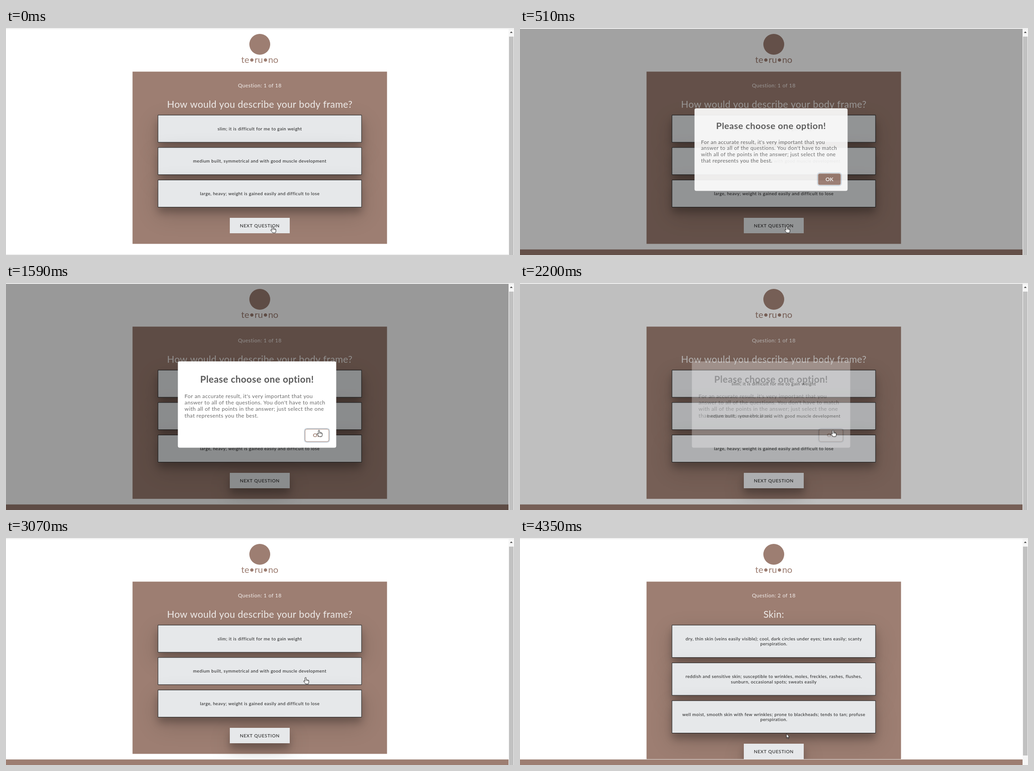
An HTML page with a canvas for the animation above (5330 ms loop, 1119 px wide and 501 px high).

```html
<!DOCTYPE html>
<html lang="en">
<head>
<meta charset="utf-8">
<title>Quiz</title>
<style>
html, body { margin: 0; width: 100%; height: 100%; overflow: hidden; background: #fff; }
canvas { display: block; }
</style>
</head>
<body>
<canvas id="stage" width="1119" height="501"></canvas>
<script>
const canvas = document.getElementById('stage');
const stage = canvas.getContext('2d');
const sheet = canvas.cloneNode().getContext('2d');
let ctx = stage;

const LOOP = 5330;
const BROWN = '#9d7e72', CARD = '#e6e8ea';
const FONT = 'Lato, "Open Sans", sans-serif';

const TICKS = [0, 350, 420, 510, 580, 640, 970, 1040, 1110, 1180, 1250, 1330, 1430, 1520, 1590,
  2200, 2260, 2330, 2400, 3070, 3140, 3540, 3620, 3700, 3770, 3850, 3930, 4350];

// Pointer path: time, x, y
const PATH = [
  [0, 587.5, 438], [969, 587.5, 438], [970, 589, 436], [1430, 660, 352], [1520, 681, 333],
  [1590, 689.5, 325], [3000, 689.5, 325], [3070, 660, 308], [3140, 652, 303],
  [3470, 652, 303], [3930, 587.5, 438], [4349, 587.5, 438], [4350, 587, 432]
];

const HAND = new Path2D('M-1.5 8.5V1.2Q-1.5-.2-.1-.2T1.3 1.2V5Q3 4.3 3.5 5.4 5 4.8 5.5 6 7 5.6 7 7.2V10' +
  'Q7 12 6 14H0Q-2 11-4.5 8.5-4.8 7-3 7.3Z');
const ARROW = new Path2D('M0 0V9.6L2.1 7.6 3.6 11 5.1 10.4 3.6 7.1H6.5Z');

const PAGES = [
  {
    count: 'Question: 1 of 18', title: 'How would you describe your body frame?',
    height: 60, step: 71.6, panel: 380.1, button: 419,
    cards: [
      ['slim; it is difficult for me to gain weight'],
      ['medium built, symmetrical and with good muscle development'],
      ['large, heavy; weight is gained easily and difficult to lose']
    ]
  },
  {
    count: 'Question: 2 of 18', title: 'Skin:',
    height: 71.6, step: 83.4, panel: 405, button: 454,
    cards: [
      ['dry, thin skin (veins easily visible); cool, dark circles under eyes; tans easily; scanty', 'perspiration.'],
      ['reddish and sensitive skin; susceptible to wrinkles, moles, freckles, rashes, flushes,', 'sunburn, occasional spots; sweats easily'],
      ['well moist, smooth skin with few wrinkles; prone to blackheads; tends to tan; profuse', 'perspiration.']
    ]
  }
];

const MESSAGE = [
  "For an accurate result, it's very important that you",
  "answer to all of the questions. You don't have to match",
  'with all of the points in the answer; just select the one',
  'that represents you the best.'
];

const clamp = v => Math.max(0, Math.min(1, v));
const mix = (a, b, k) => a + (b - a) * k;

// CSS "ease": cubic-bezier(.25, .1, .25, 1)
function ease(x) {
  if (x <= 0) return 0;
  if (x >= 1) return 1;
  const bez = (a, b, s) => 3 * a * s * (1 - s) ** 2 + 3 * b * s * s * (1 - s) + s ** 3;
  let lo = 0, hi = 1;
  for (let i = 0; i < 24; i++) {
    const m = (lo + hi) / 2;
    if (bez(.25, .25, m) < x) lo = m; else hi = m;
  }
  return bez(.1, 1, lo);
}

function popScale(p) {
  if (p < .45) return mix(.5, 1.05, ease((p - .01) / .44));
  if (p < .8) return mix(1.05, .95, ease((p - .45) / .35));
  return mix(.95, 1, ease((p - .8) / .2));
}

function rect(x, y, w, h, color) {
  ctx.fillStyle = color;
  ctx.fillRect(x, y, w, h);
}

function round(x, y, w, h, r) {
  ctx.beginPath();
  ctx.roundRect(x, y, w, h, r);
}

function outline(color, width) {
  ctx.strokeStyle = color;
  ctx.lineWidth = width;
  ctx.stroke();
}

function text(str, x, y, size, color, { gap = 0, weight = 400, align = 'center' } = {}) {
  ctx.font = `${weight} ${size}px ${FONT}`;
  ctx.letterSpacing = gap + 'px';
  ctx.textAlign = align;
  ctx.fillStyle = color;
  ctx.fillText(str, x, y);
}

function raised(x, y, w, h, lift) {
  for (const [dy, blur, alpha] of [[17, 50, .19], [12, 16, .24]]) {
    if (lift <= 0) break;
    ctx.save();
    ctx.shadowColor = `rgba(0,0,0,${alpha * lift})`;
    ctx.shadowBlur = blur;
    ctx.shadowOffsetY = dy;
    rect(x, y, w, h, CARD);
    ctx.restore();
  }
  rect(x, y, w, h, CARD);
}

function drawPage(page, cardLift, buttonLift) {
  ctx.fillStyle = BROWN;
  ctx.beginPath();
  ctx.arc(559, 36, 23, 0, 7);
  ctx.fill();
  text('te•ru•no', 559, 77, 20, BROWN);

  rect(278.7, 96.3, 560.6, page.panel, BROWN);
  text(page.count, 559, 131, 11.5, '#f3efed', { gap: .45 });
  text(page.title, 559, 176, 21, '#f0edeb', { gap: .34 });

  page.cards.forEach((lines, i) => {
    const y = 192.2 + i * page.step;
    raised(334.8, y, 448.4, page.height, i === 1 ? cardLift : 1);
    ctx.beginPath();
    ctx.rect(334.8, y, 448.4, page.height);
    outline('#111', 1);
    lines.forEach((line, n) => text(line, 559, y + 33.6 + n * 11.6, 9.8, '#1c1c1c', { gap: .45 }));
  });

  raised(493, page.button, 132, 34, buttonLift);
  text('NEXT QUESTION', 559, page.button + 20.5, 10, '#181818', { gap: .65 });
}

function drawModal(hover) {
  const grow = hover ? 1 : 0;
  round(378.6, 174 - grow, 348.8, 188.6 + 2 * grow, 4);
  ctx.fillStyle = '#fff';
  ctx.fill();
  text('Please choose one option!', 553, 221 - grow, 20.5, '#595959', { gap: .48, weight: 700 });
  MESSAGE.forEach((line, i) =>
    text(line, 393.3, 255.2 + i * 14.1 - grow, 12, '#6a6a6a', { gap: .4, align: 'left' }));

  const x = 660.3 - 1.5 * grow, y = 323 - grow / 2, w = 51.4 + grow, h = 26 + 1.5 * grow;
  round(x - 1.5, y - 1.5, w + 3, h + 3, 5);
  outline('#c3d2de', 1.5);
  round(x, y, w, h, 4);
  if (hover) {
    outline(BROWN, 1);
  } else {
    ctx.fillStyle = BROWN;
    ctx.fill();
  }
  text('OK', 686 - grow, 340.4, 12, hover ? BROWN : '#fff', { weight: 700 });
}

// Paints the dialog on its own sheet so that it fades as one piece.
function showModal(scale, alpha, hover) {
  ctx = sheet;
  ctx.clearRect(0, 0, 1119, 501);
  ctx.save();
  ctx.translate(553, 268.3);
  ctx.scale(scale, scale);
  ctx.translate(-553, -268.3);
  drawModal(hover);
  ctx.restore();
  ctx = stage;
  ctx.globalAlpha = alpha;
  ctx.drawImage(sheet.canvas, 0, 0);
  ctx.globalAlpha = 1;
}

function drawChrome(thumbEnd) {
  rect(0, 0, 1119, 2, '#fff');
  rect(0, 1, 1119, 1, '#dedede');
  rect(1107, 2, 12, 499, '#f6f6f6');
  rect(1108, 19, 10, thumbEnd - 19, '#c1c1c1');
  ctx.fillStyle = '#505050';
  ctx.beginPath();
  ctx.moveTo(1110, 11);
  ctx.lineTo(1113, 7.5);
  ctx.lineTo(1116, 11);
  ctx.fill();
}

function drawPointer(t) {
  let i = PATH.length - 1;
  while (PATH[i][0] > t) i--;
  const a = PATH[i], b = PATH[i + 1] || a;
  const k = b === a ? 0 : (t - a[0]) / (b[0] - a[0]);
  const hand = t < 970 || (t >= 1520 && t < 4350);
  const shape = hand ? HAND : ARROW;
  ctx.save();
  ctx.translate(mix(a[1], b[1], k), mix(a[2], b[2], k));
  ctx.fillStyle = '#fff';
  ctx.fill(shape);
  ctx.strokeStyle = '#111';
  ctx.lineWidth = .9;
  ctx.lineJoin = 'round';
  ctx.stroke(shape);
  if (hand) {
    ctx.beginPath();
    for (const x of [1.3, 3.5, 5.5]) {
      ctx.moveTo(x, 5.5);
      ctx.lineTo(x, 7.8);
    }
    outline('#111', .7);
  }
  ctx.restore();
}

function draw(t) {
  const second = t >= 4350;
  const open = t >= 350 && t < 2400;
  const closing = t >= 2200;
  const cardLift = second ? 1 : 1 - ease((t - 2990) / 120) + ease((t - 3480) / 300);
  const buttonLift = second ? 1 : ease((t - 970) / 400) - ease((t - 3700) / 230);

  rect(0, 0, 1119, 501, '#fff');
  drawPage(PAGES[second ? 1 : 0], clamp(cardLift), clamp(buttonLift));
  if (t >= 350) {
    rect(0, 488, 1107, 1, '#e3dedb');
    rect(0, 489, 1107, 12, BROWN);
  } else {
    rect(0, 500, 1107, 1, '#dedede');
  }

  if (open) {
    const shown = (t - 319) / 300, hidden = t - 2130;
    const shade = closing ? 1 - ease(hidden / 300) : ease(shown);
    const fade = closing ? shade * (1 - ease(hidden / 240)) : shade;
    rect(0, 2, 1107, 499, `rgba(0,0,0,${.4 * shade})`);
    showModal(closing ? 1 : popScale(clamp(shown)), fade, t >= 1520);
  }
  drawChrome(second ? 480 : 501);
  drawPointer(t);
}

function frame() {
  const t = performance.now() % LOOP;
  draw(TICKS.findLast(k => k <= t));
  requestAnimationFrame(frame);
}
frame();
</script>
</body>
</html>
```
